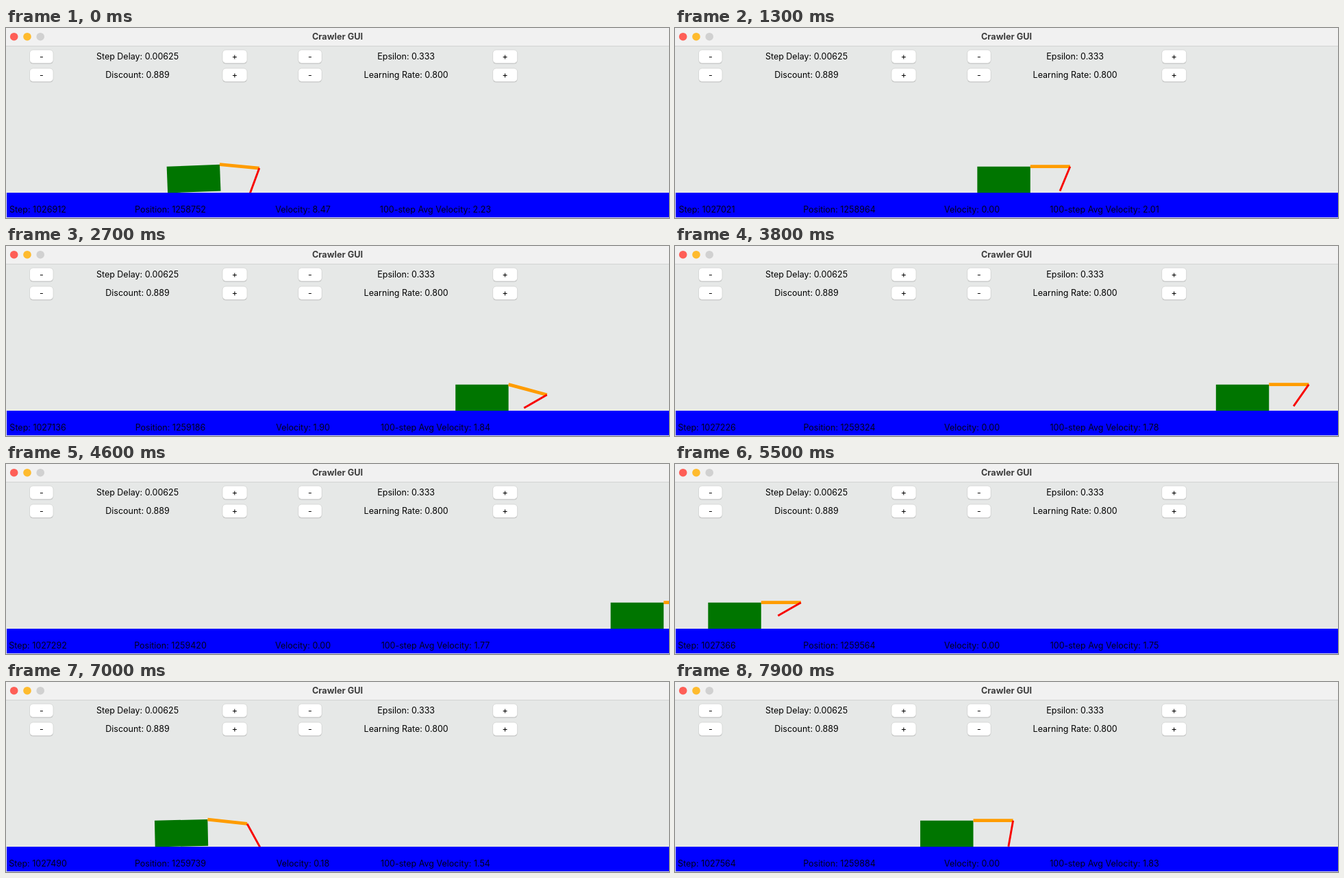
These frames come from a looping animation (968x278 px, 8000 ms). An HTML page:

```html
<!DOCTYPE html>
<html lang="en">
<head>
<meta charset="utf-8">
<title>Crawler GUI</title>
<style>
  html, body { margin: 0; width: 100%; height: 100%; overflow: hidden; background: #e6e8e7; }
  svg { display: block; width: 968px; height: 278px; overflow: hidden; }
  text { font: 12.5px Inter, "Open Sans", sans-serif; text-anchor: middle; fill: #000; }
  .title { font-size: 12.7px; font-weight: 700; fill: #3c3c3c; }
  .button { fill: #fff; stroke: #cfd0cf; stroke-width: .7; }
  .status text { fill: #00001c; }
</style>
</head>
<body>
<svg id="stage" viewBox="0 0 968 278">
  <rect width="968" height="278" fill="#e6e8e7"/>
  <rect width="968" height="26" fill="#f1f1f1"/>
  <rect y="26" width="968" height="1" fill="#d2d3d2"/>
  <circle cx="11.7" cy="12.7" r="5.8" fill="#fe5f57"/>
  <circle cx="31" cy="12.7" r="5.8" fill="#febb2e"/>
  <circle cx="50.2" cy="12.7" r="5.8" fill="#d1d1d1"/>
  <text class="title" x="484" y="17">Crawler GUI</text>
  <g id="controls"></g>
  <polygon id="body" fill="#007500"/>
  <line id="arm" stroke="#ff9c00" stroke-width="4.8"/>
  <line id="hand" stroke="#f80400" stroke-width="2.9"/>
  <rect x="1" y="241" width="967" height="36" fill="#00f"/>
  <rect y="277" width="968" height="1" fill="#d4d6e0"/>
  <g id="status" class="status"></g>
</svg>
<script>
const $ = id => document.getElementById(id);
const SVG = 'http://www.w3.org/2000/svg';

function add(parent, tag, attrs, text = '') {
  const node = document.createElementNS(SVG, tag);
  setAttrs(node, attrs);
  node.textContent = text;
  return parent.appendChild(node);
}
function setAttrs(node, attrs) {
  for (const key in attrs) node.setAttribute(key, attrs[key]);
}

// Parameter controls
function addButton(x, y, width, label) {
  add($('controls'), 'rect', { x, y: y + 1, width, height: 19.6, rx: 5, fill: '#c3c4c3' });
  add($('controls'), 'rect', { x, y, width, height: 19.5, rx: 5, class: 'button' });
  add($('controls'), 'text', { x: x + width / 2, y: y + 13.7 }, label);
}
function addControl(left, y, label) {
  addButton(left, y, 34.5, '-');
  add($('controls'), 'text', { x: left + 157.5, y: y + 13.7 }, label);
  addButton(left + (left < 100 ? 281.5 : 284), y, 36, '+');
}
addControl(34.5, 32, 'Step Delay: 0.00625');
addControl(426.7, 32, 'Epsilon: 0.333');
addControl(34.5, 59, 'Discount: 0.889');
addControl(426.7, 59, 'Learning Rate: 0.800');

const labels = [46.5, 240, 433.5, 627].map(x => add($('status'), 'text', { x, y: 269.5 }));

// Crawler geometry in its own units
const SCALE = 0.968, TRACK = 1006, GROUND = 241.4;
const WIDTH = 80, HEIGHT = 40, ARM = 60, HAND = 40;
const CYCLE = 18;
const rad = degrees => degrees * Math.PI / 180;

// Swing the hand out, lower the arm, pull, lift again
function pose(phase) {
  const p = ((phase % CYCLE) + CYCLE) % CYCLE;
  let armStep, handStep;
  if (p < 8) [armStep, handStep] = [4, p];
  else if (p < 14) [armStep, handStep] = [3, 15 - p];
  else if (p < 17) [armStep, handStep] = [2, 16 - p];
  else [armStep, handStep] = [3, 0];
  const arm = rad(-30 + 7.5 * armStep), hand = rad(-150 + 12.5 * handStep);
  return {
    arm, hand,
    x: WIDTH + ARM * Math.cos(arm) + HAND * Math.cos(hand),
    y: HEIGHT + ARM * Math.sin(arm) + HAND * Math.sin(hand)
  };
}

function displacement(a, b) {
  if (a.y >= 0 && b.y >= 0) return 0;
  const contact = a.x - a.y * (b.x - a.x) / (b.y - a.y);
  const before = a.y < 0 ? Math.hypot(a.x, a.y) : contact;
  const after = b.y < 0 ? Math.hypot(b.x, b.y) : contact;
  return before - after;
}
const velocity = phase => displacement(pose(phase - 1), pose(phase));

function travel(from, to) {
  let sum = 0;
  for (let p = from + 1; p <= to; p++) sum += velocity(p);
  return sum;
}

// time, gait phase, step, position, average velocity
const keys = [
  [0, 12, 1026912, 1258752, 2.23],
  [1300, 93, 1027021, 1258964, 2.01],
  [2700, 160, 1027136, 1259186, 1.84],
  [3800, 218, 1027226, 1259324, 1.78],
  [5500, 306, 1027366, 1259564, 1.75],
  [7000, 368, 1027490, 1259739, 1.54],
  [7900, 418, 1027564, 1259884, 1.83]
];
const mix = (a, b, u) => a + (b - a) * u;

function stateAt(time) {
  let i = 0;
  while (i < keys.length - 2 && time >= keys[i + 1][0]) i++;
  const [t0, p0, s0, x0, v0] = keys[i], [t1, p1, s1, x1, v1] = keys[i + 1];
  const u = (time - t0) / (t1 - t0);
  const phase = Math.round(mix(p0, p1, u));
  return {
    phase,
    step: Math.round(mix(s0, s1, u)),
    position: mix(x0, x1, travel(p0, phase) / travel(p0, p1)),
    average: mix(v0, v1, u)
  };
}

function drawCrawler(position, { arm, hand, x, y }) {
  const tilt = y < 0 ? Math.atan(-y / x) : 0;
  const move = ([px, py], length, angle) => [
    px + SCALE * length * Math.cos(angle + tilt),
    py - SCALE * length * Math.sin(angle + tilt)
  ];
  const corner = [(position % TRACK) * SCALE - 2, GROUND];
  const right = move(corner, WIDTH, 0);
  const top = move(corner, HEIGHT, Math.PI / 2);
  const shoulder = move(top, WIDTH, 0);
  const elbow = move(shoulder, ARM, arm);
  const tip = move(elbow, HAND, hand);
  const drawLine = (id, a, b) => setAttrs($(id), { x1: a[0], y1: a[1], x2: b[0], y2: b[1] });
  setAttrs($('body'), { points: [corner, right, shoulder, top].join(' ') });
  drawLine('arm', shoulder, elbow);
  drawLine('hand', elbow, tip);
}

function render(time) {
  const { phase, step, position, average } = stateAt(Math.floor(time / 100) * 100);
  drawCrawler(position, pose(phase));
  [
    `Step: ${step}`,
    `Position: ${Math.round(position)}`,
    `Velocity: ${velocity(phase).toFixed(2)}`,
    `100-step Avg Velocity: ${average.toFixed(2)}`
  ].forEach((text, i) => { labels[i].textContent = text; });
}

const start = performance.now();
function tick() {
  render((performance.now() - start) % 8000);
  requestAnimationFrame(tick);
}
tick();
</script>
</body>
</html>
```
